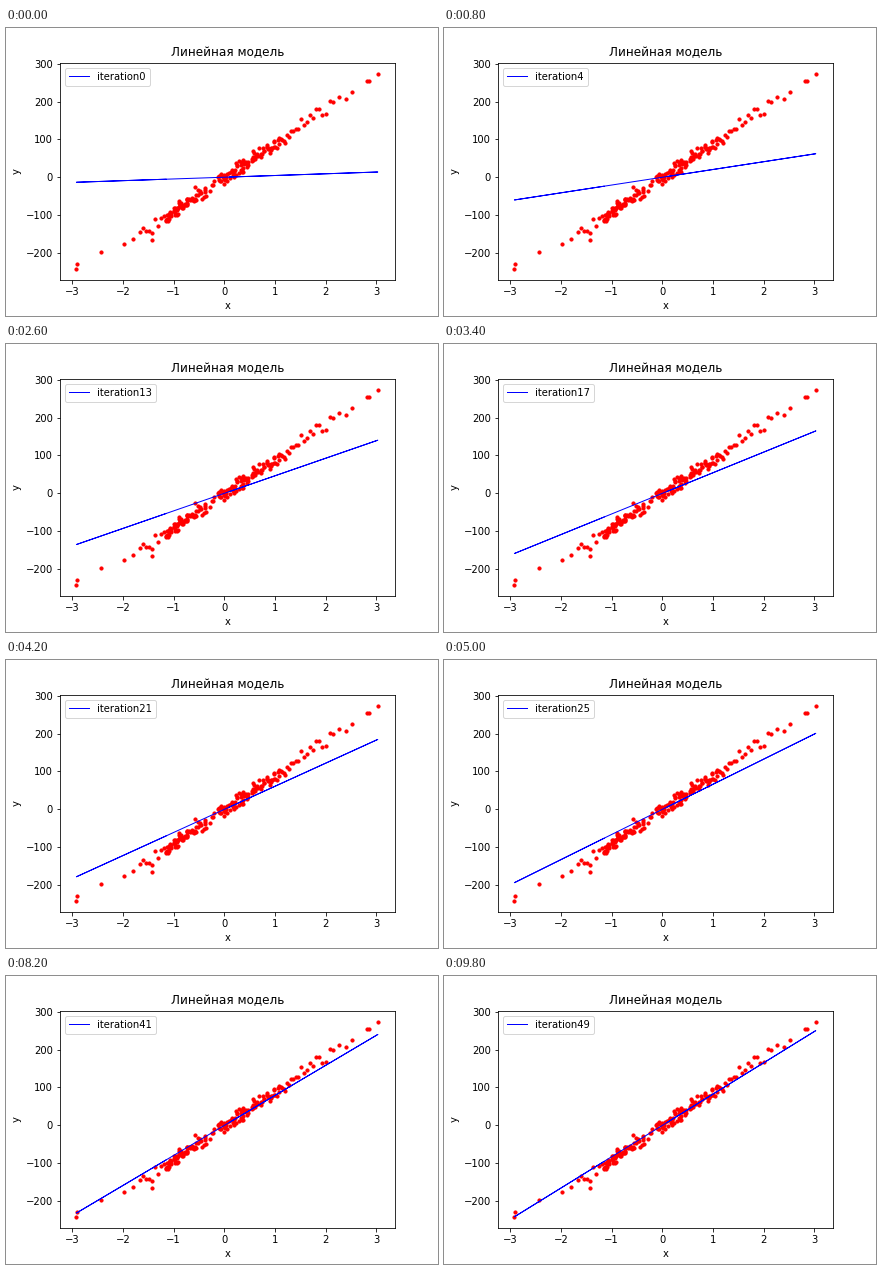
These frames come from a looping animation (432 by 288 pixels, 10000 ms). A matplotlib script:

```python
import numpy as np
import matplotlib.pyplot as plt
from matplotlib.animation import FuncAnimation

FRAMES, INTERVAL = 50, 200
TREND, NOISE = 90, 10
SLOPE, BIAS, DECAY = 89.3, -0.6, 0.949

# Points that stand apart from the cloud
FAR = [(-2.92, -242), (-2.90, -230), (-2.44, -198), (-1.99, -177),
       (-1.81, -163), (-1.43, -166), (-0.57, -27), (2.27, 212),
       (2.40, 207), (2.52, 226), (2.82, 254), (2.86, 255), (3.03, 273)]


def make_cloud():
    rng = np.random.RandomState(4)
    left = -np.linspace(1.19, 1.66, 9)
    negative = rng.uniform(-1.16, -0.72, 48)
    middle = rng.uniform(-0.7, 1.02, 105)
    right = 1.05 + 1.1 * np.linspace(0, 1, 25) ** 1.6
    x = np.concatenate([left, negative, middle, right])
    noise = np.clip(rng.normal(0, NOISE, x.size), -18, 18)
    cloud = np.column_stack([x, TREND * x + noise])
    return np.vstack([FAR, cloud]).T


def predict(i):
    gain = 1 - DECAY ** (i + 1)
    return gain * (SLOPE * sweep + BIAS)


x, y = make_cloud()
# The stroke doubles back at both ends, so only its middle stays thin
sweep = np.array([-1.15, x.min(), x.max(), 0.1])

fig, ax = plt.subplots(figsize=(6, 4), dpi=72)
fig.subplots_adjust(left=0.125, right=0.9, bottom=0.125, top=0.88)
ax.scatter(x, y, s=10, c="r", linewidths=1)
line, = ax.plot(sweep, predict(0), "b", lw=1, label="iteration0")
ax.set(xlim=(-3.244, 3.366), ylim=(-271.9, 303.3),
       title="Линейная модель", xlabel="x", ylabel="y")
label = ax.legend(loc="upper left").get_texts()[0]


def update(i):
    line.set_ydata(predict(i))
    label.set_text(f"iteration{i}")
    return line, label


anim = FuncAnimation(fig, update, frames=FRAMES, interval=INTERVAL,
                     repeat=True, repeat_delay=0)
plt.show()
```
